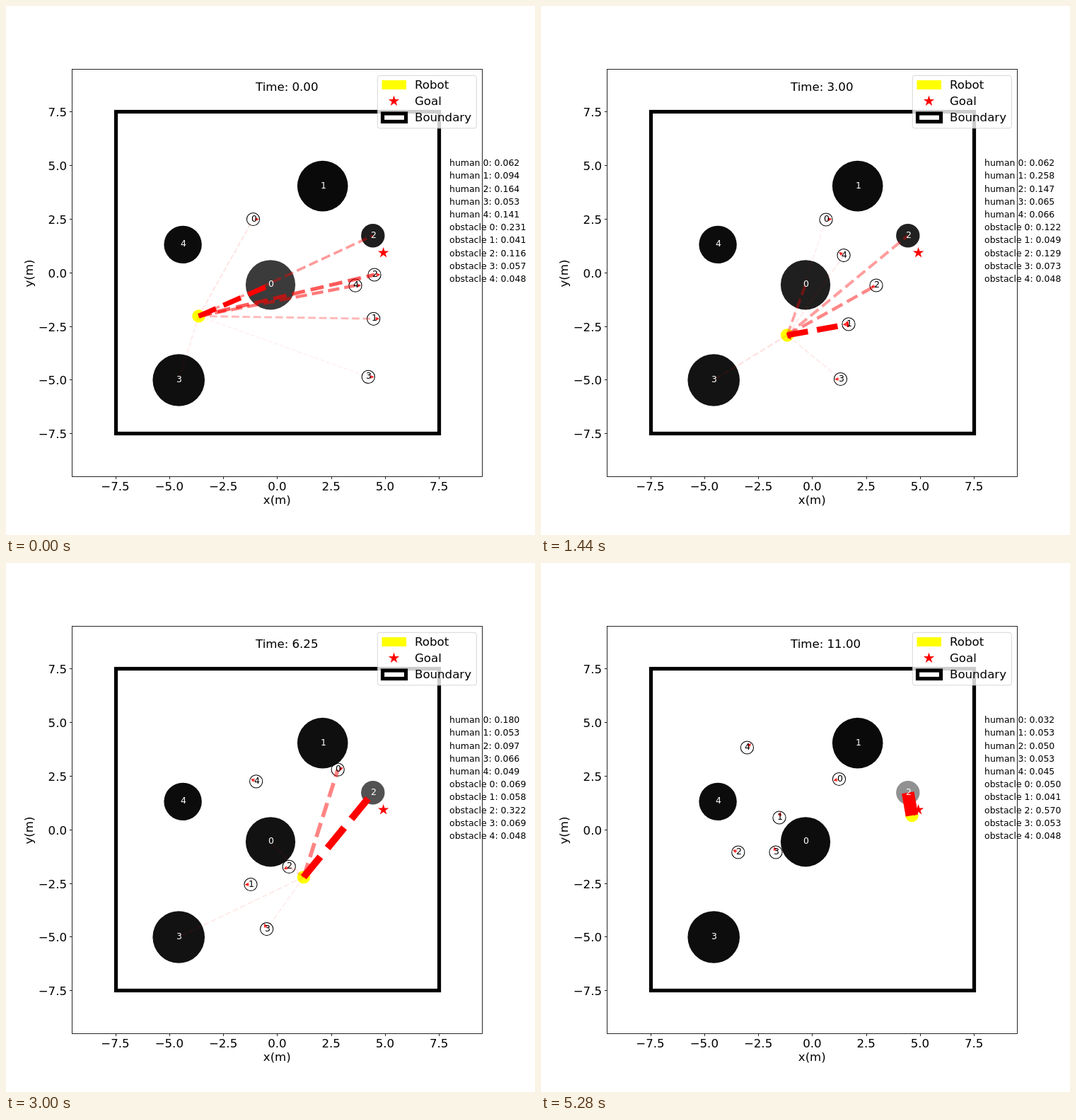
An HTML page that plays this animation: 748x748 px, repeating every 5.4 s.

```html
<!DOCTYPE html>
<html lang="en">
<head>
<meta charset="utf-8">
<title>Robot navigation</title>
<style>
  html, body { margin: 0; width: 100%; height: 100%; overflow: hidden; background: #fff; }
  svg { display: block; width: 748px; height: 748px; font: 16.62px "DejaVu Sans", sans-serif; }
  .small { font-size: 12.47px; }
  .mid { text-anchor: middle; }
  .end { text-anchor: end; }
</style>
</head>
<body>
<svg id="stage" viewBox="0 0 748 748">
  <g id="obstacles"></g>
  <g id="agents"></g>
  <rect x="155.5" y="149.5" width="457" height="455" fill="none" stroke="#000" stroke-width="5.2"/>
  <path id="goal" fill="red"/>
  <g id="links" fill="none" stroke="red"></g>
  <rect x="93.5" y="89.5" width="580" height="576" fill="none" stroke="#000" stroke-width=".85"/>
  <g id="ticks"></g>
  <text class="mid" x="383.3" y="704">x(m)</text>
  <text class="mid" transform="translate(38 378) rotate(-90)">y(m)</text>
  <g id="labels" class="small"></g>
  <text id="clock" x="353" y="120"></text>
  <g id="legend">
    <rect x="525.3" y="98.3" width="140" height="74.6" rx="3.3" fill="#fff" stroke="#ccc" opacity=".8"/>
    <rect x="532" y="105.5" width="33.5" height="12" fill="#ff0" stroke="#ff0"/>
    <path id="key" fill="red"/>
    <rect x="532.5" y="152" width="33" height="11.5" fill="none" stroke="#000" stroke-width="5.2"/>
    <text x="578" y="117">Robot</text>
    <text x="578" y="140">Goal</text>
    <text x="578" y="163">Boundary</text>
  </g>
</svg>
<script>
const STEP = 120, FRAMES = 45, PX_PER_WEIGHT = 31.17;
const { exp, round } = Math;
const el = id => document.getElementById(id);

function set(node, attrs) {
  for (const k in attrs) node.setAttribute(k, attrs[k]);
}
function add(parent, tag, attrs, text = "") {
  const node = document.createElementNS("http://www.w3.org/2000/svg", tag);
  set(node, attrs);
  node.textContent = text;
  return el(parent).appendChild(node);
}

// Straight legs between waypoints [frame, x, y]
const walk = (...pts) => n => {
  let i = 1;
  while (i < pts.length - 1 && n > pts[i][0]) i++;
  const [t0, x0, y0] = pts[i - 1], [t1, x1, y1] = pts[i];
  const u = (n - t0) / (t1 - t0);
  return [x0 + (x1 - x0) * u, y0 + (y1 - y0) * u];
};
const humans = [
  walk([0, 349.5, 301.5], [7, 387, 303.5], [12, 403, 302], [21, 446, 299.5], [31, 504, 281], [44, 421.5, 305.5]),
  walk([0, 519.7, 442.3], [7, 473, 447.6], [21, 366.5, 454], [29, 325.5, 455], [37, 327, 408.3], [44, 337, 360]),
  walk([0, 521, 380], [7, 497.7, 384.5], [12, 474, 395], [29, 377.5, 440], [37, 328, 429.5], [44, 278.8, 409]),
  walk([0, 512.3, 524.4], [12, 423.5, 527.5], [21, 374, 529.4], [29, 363.3, 505.7], [44, 332, 409]),
  walk([0, 494, 395.2], [7, 458.5, 371.7], [21, 373.3, 318], [29, 334, 299.7], [38, 274.7, 279], [44, 291.4, 261])
];
// Ahead, then a dip below human 1, then diagonally to the goal
const robot = walk([0, 272.5, 438.5], [7, 320.7, 438.5], [16, 370, 487], [17, 377.5, 487], [21, 399.3, 465.5], [37, 485.5, 380], [44, 524.5, 357]);
const movers = [...humans, robot];

const rocks = [[374, 394.3, 35.1], [447.7, 254.6, 35.8], [518.8, 324.7, 16.7], [244.2, 529, 36.8], [250.1, 337.4, 26.7]];

// Attention over time: falling steps and rounded bumps on a low base
const fade = (n, mid, w) => 1 / (1 + exp((n - mid) / w));
const bump = (n, mid, w, power = 2) => exp(-(Math.abs((n - mid) / w) ** power));
const attention = [
  n => .032 + .03 * fade(n, 34, 1.5) + .118 * bump(n, 24.6, 6, 4),
  n => .053 + .2 * bump(n, 12, 5.2) + .045 * fade(n, 6, 3),
  n => .05 + .093 * fade(n, 25, 1) + .023 * fade(n, 7, 3),
  n => .05 + .016 * bump(n, 22, 19, 4),
  n => .045 + .096 * exp(-n / 8),
  n => .05 + .051 * fade(n, 24, 2) + .13 * fade(n, 9.5, 1.5),
  n => .041 + .021 * bump(n, 21, 9),
  n => .115 + .46 * (1 - fade(n, 25.8, 4)),
  n => .052 + .024 * bump(n, 17, 14),
  () => .048
];

function star(id, cx, cy) {
  const pts = Array.from({ length: 10 }, (_, i) => {
    const a = i * Math.PI / 5, r = i % 2 ? 3.1 : 8.1;
    return (cx + r * Math.sin(a)).toFixed(2) + " " + (cy - r * Math.cos(a)).toFixed(2);
  });
  set(el(id), { d: "M" + pts.join("L") + "Z" });
}
star("goal", 533.6, 349);
star("key", 548.5, 134.5);

for (let v = -7.5; v <= 7.5; v += 2.5) {
  const x = 383.35 + v * 30.51, y = 377.74 - v * 30.31;
  const name = v.toFixed(1).replace("-", "\u2212");
  add("ticks", "path", { d: `M${round(x) + .5} 665.5v3.6M93.5 ${round(y) - .5}h-3.6`, stroke: "#000", "stroke-width": .85 });
  add("ticks", "text", { class: "mid", x, y: 685 }, name);
  add("ticks", "text", { class: "end", x: 86, y: round(y + 6) }, name);
}

const tagAt = (x, y) => ({ x: round(x - 3), y: round(y + 3) });
const thin = { fill: "none", "stroke-width": 1.04 };
const discs = rocks.map(([cx, cy, r]) => add("obstacles", "circle", { cx, cy, r }));
const rings = movers.map(m => add("agents", "circle", m === robot
  ? { r: 9.2, fill: "#ff0" }
  : { r: 9.1, stroke: "#000", ...thin }));
const arrows = movers.map(() => add("agents", "path", { d: "M2 0H7M3 -2L7 0L3 2", stroke: "red", ...thin }));
const links = attention.map(() => add("links", "path", {}));
const rows = attention.map((_, i) => add("labels", "text", { x: 627, y: round(226.2 + i * 18.19) }));
const tags = humans.map((_, i) => add("labels", "text", {}, i));
rocks.forEach(([x, y], i) => add("labels", "text", { ...tagAt(x, y), fill: "#fff" }, i));

function draw(n) {
  const pos = movers.map(m => m(n));
  const weights = attention.map(a => a(n));
  const low = Math.min(...weights), high = Math.max(...weights);
  const ends = [...pos.slice(0, humans.length), ...rocks];

  pos.forEach(([x, y], i) => {
    const [px, py] = movers[i](Math.max(0, n - 1));
    const angle = Math.atan2(y - py, x - px) * 180 / Math.PI;
    set(rings[i], { cx: x, cy: y });
    set(arrows[i], { transform: `translate(${x} ${y}) rotate(${angle})` });
  });
  tags.forEach((tag, i) => set(tag, tagAt(...pos[i])));

  weights.forEach((v, i) => {
    const width = v * PX_PER_WEIGHT, alpha = (v - low) / (high - low);
    set(links[i], {
      d: `M${robot(n)}L${ends[i][0]} ${ends[i][1]}`,
      "stroke-width": width,
      "stroke-dasharray": `${3.7 * width} ${1.6 * width}`,
      opacity: alpha < .05 ? 0 : alpha
    });
    rows[i].textContent = `${i < 5 ? "human" : "obstacle"} ${i % 5}: ${v.toFixed(3)}`;
  });
  discs.forEach((disc, i) => {
    const g = round(weights[i + 5] * 255);
    set(disc, { fill: `rgb(${g},${g},${g})` });
  });
  el("clock").textContent = "Time: " + (n / 4).toFixed(2);
}

let shown = -1;
const start = performance.now();
function tick() {
  const n = Math.floor((performance.now() - start) / STEP) % FRAMES;
  if (n !== shown) draw(shown = n);
  requestAnimationFrame(tick);
}
tick();
</script>
</body>
</html>
```
